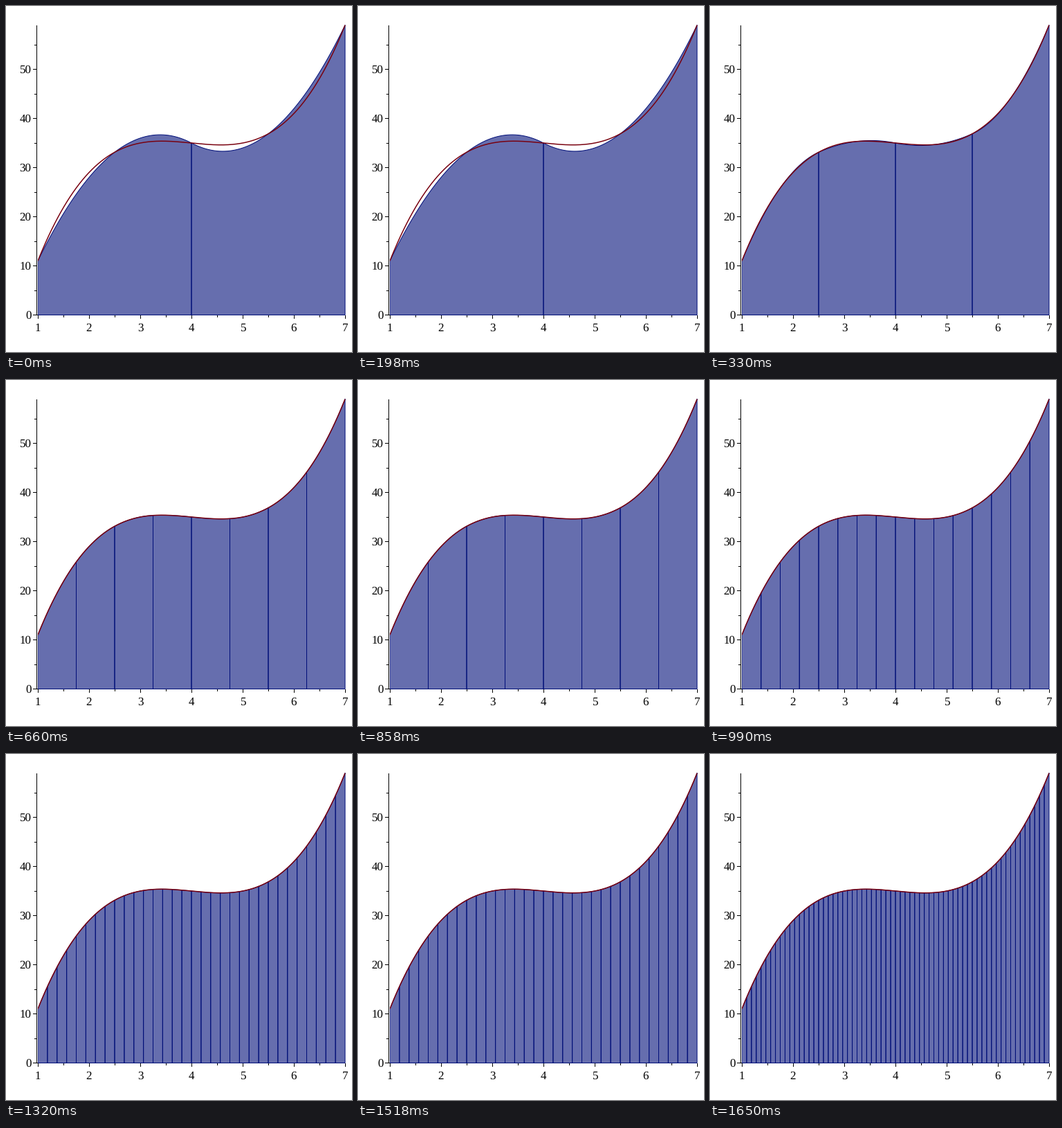
Recreate the animation shown at these times as a matplotlib script. Size 500 px wide and 500 px high, loop 1.98 s.

```python
import numpy as np
import matplotlib.pyplot as plt
from matplotlib.animation import FuncAnimation
from matplotlib.collections import PolyCollection
from matplotlib.patches import Rectangle

plt.rcParams["text.hinting"] = "none"

DPI = 100
PX = 72 / DPI  # one pixel in points
BLUE = (0, 14 / 255, 120 / 255)
RED = "#78000E"
A, B = 1, 7


def f(x):
    return x**3 - 12 * x**2 + 47 * x - 25


def sx(x):
    return 46 + 74 * (x - A)


def sy(y):
    return 446.5 - 7.1 * y


fig = plt.figure(figsize=(5, 5), dpi=DPI, facecolor="white")
ax = fig.add_axes([0, 0, 1, 1])
ax.set(xlim=(0, 500), ylim=(500, 0))
ax.axis("off")


def stroke(xs, ys):
    ax.plot(xs, ys, color="black", lw=PX, solid_capstyle="butt",
            snap=False, zorder=1)


def label(x, y, text, ha):
    ax.text(x, y, text, ha=ha, va="baseline", fontsize=17 * PX,
            family="Liberation Serif", color="black")


def draw_axes():
    stroke([44.5, 44.5], [28, 447])
    stroke([44, 490], [446.5, 446.5])
    for i in range(2 * (B - A) + 1):
        x = sx(A + i / 2) + 0.5
        major = i % 2 == 0
        stroke([x, x], [447, 452 if major else 450])
        if major:
            label(x - 0.5, 470, str(A + i // 2), "center")
    for v in range(0, 60, 5):
        y = np.floor(sy(v)) + 0.5
        major = v % 10 == 0
        stroke([39 if major else 41, 44], [y, y])
        if major:
            label(36.5, y + 5.8, str(v), "right")


def simpson_panel(a, b):
    """Outline of the area under the parabola through both ends and the middle."""
    m, h = (a + b) / 2, (b - a) / 2
    t = np.linspace(-1, 1, 61)
    slope = (f(b) - f(a)) / 2
    bend = (f(a) + f(b)) / 2 - f(m)
    y = f(m) + slope * t + bend * t**2
    xs = np.r_[a, m + h * t, b]
    ys = np.r_[0, y, 0]
    return np.column_stack([sx(xs), sy(ys)])


draw_axes()

panels = PolyCollection([], facecolors=[(*BLUE, 0.6)], edgecolors=[BLUE],
                        linewidths=PX, zorder=2)
panels.set_snap(False)
ax.add_collection(panels, autolim=False)

x = np.linspace(A, B, 400)
curve, = ax.plot(sx(x), sy(f(x)), color=RED, lw=1.5 * PX, snap=False,
                 solid_capstyle="butt", zorder=3)

frame = Rectangle((46, 27), 445, 420, transform=ax.transData)
for artist in (panels, curve):
    artist.set_clip_path(frame)


def update(i):
    edges = np.linspace(A, B, 2 ** (i + 1) + 1)
    panels.set_verts([simpson_panel(a, b) for a, b in zip(edges, edges[1:])])
    return panels,


anim = FuncAnimation(fig, update, frames=6, interval=330, repeat=True,
                     repeat_delay=0, blit=False)
plt.show()
```
